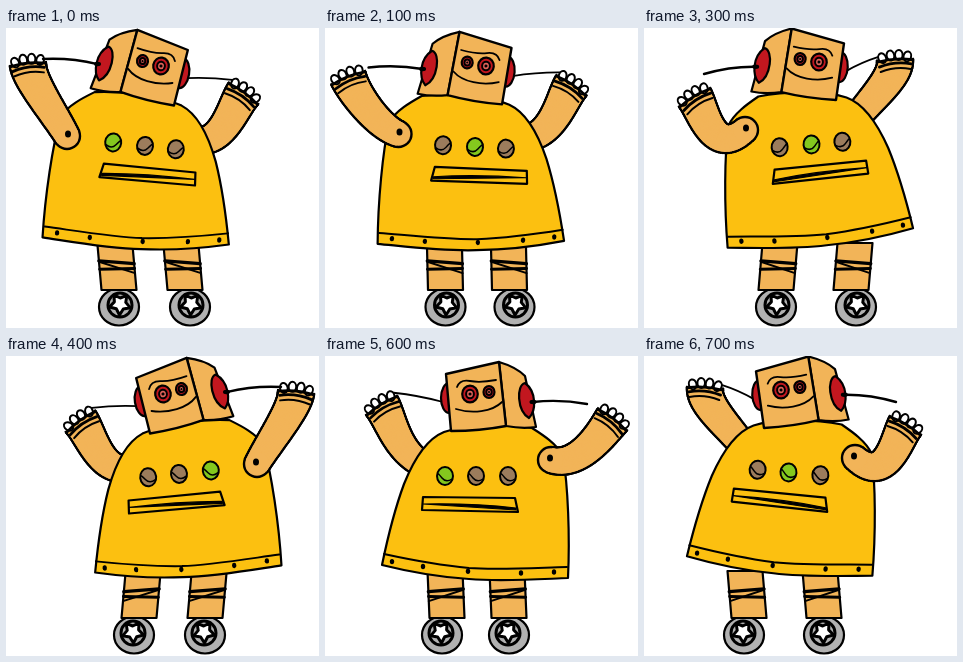
An HTML page with a canvas that plays this animation: 313 by 300 pixels, repeating every 0.8 s.

```html
<!DOCTYPE html>
<html lang="en">
<head>
<meta charset="utf-8">
<title>Dancing robot</title>
<style>
html, body { margin: 0; width: 100%; height: 100%; overflow: hidden; background: #fff; }
canvas { display: block; }
</style>
</head>
<body>
<canvas id="stage" width="313" height="300"></canvas>
<script>
const ctx = document.getElementById('stage').getContext('2d');
const STEP = 100, WIDTH = 312;
const SKIN = '#f2b458', GOLD = '#fcc010', RED = '#c2171f', GREY = '#b1b1b1',
      BROWN = '#9c7c5c', GREEN = '#84c81e', BLACK = '#000';

// Key poses. Parts are [x, y, degrees]; an arm hangs from wrist over elbow to shoulder.
const leanLeft = {
  body: [140, 118, 6.2], panel: [140, 118, 6.2], head: [155, 38, 9],
  near: { wrist: [22, 37, -6], elbow: [48, 85], shoulder: [61, 108] },
  far: { wrist: [237, 66, 36], elbow: [216, 118], shoulder: [190, 112] },
  tip: [37, 31], feet: [113, 184]
};
const upright = {
  body: [162, 120, 0], panel: [162, 120, 0], head: [167, 38, 0],
  near: { wrist: [25, 64, -37], elbow: [58, 112], shoulder: [86, 104] },
  far: { wrist: [255, 50, 32], elbow: [240, 94], shoulder: [215, 108] },
  tip: [50, 48], feet: [128, 195]
};
const leanRight = {
  body: [173, 114.5, -2], panel: [168.5, 116.3, -5], head: [175, 34, 3],
  near: { wrist: [51, 70, -31], elbow: [70, 130], shoulder: [101, 102] },
  far: { wrist: [251, 33, -4], elbow: [226, 72], shoulder: [206, 98] },
  tip: [60, 46], feet: [132, 212]
};

const mix = (a, b, t) => {
  if (typeof a === 'number') return a + (b - a) * t;
  if (Array.isArray(a)) return a.map((v, i) => mix(v, b[i], t));
  return Object.fromEntries(Object.keys(a).map(k => [k, mix(a[k], b[k], t)]));
};
const poses = [leanLeft, mix(leanLeft, upright, .5), upright, leanRight];
const lights = [0, 1, 2, 1];

function paint(path, fill, width = 2.2) {
  if (fill) { ctx.fillStyle = fill; ctx.fill(path); }
  if (width) { ctx.lineWidth = width; ctx.stroke(path); }
}
const shape = (d, fill, width) => paint(new Path2D(d), fill, width);
const poly = (pts, fill, width) => shape('M' + pts.join('L') + 'Z', fill, width);
const line = (pts, width) => shape('M' + pts.join('L'), null, width);

function oval(x, y, rx, ry, fill, width, turn = 0) {
  const p = new Path2D();
  p.ellipse(x, y, rx, ry, turn, 0, Math.PI * 2);
  paint(p, fill, width);
}

// Point (dx, dy) from a part's pivot, turned with the part.
function reach([x, y, deg], dx, dy) {
  const a = deg * Math.PI / 180, c = Math.cos(a), s = Math.sin(a);
  return [x + dx * c - dy * s, y + dx * s + dy * c];
}

// Runs draw with the pivot (px, py) moved to the part's place.
function placed([x, y, deg], px, py, draw) {
  ctx.save();
  ctx.translate(x, y);
  ctx.rotate(deg * Math.PI / 180);
  ctx.translate(-px, -py);
  draw();
  ctx.restore();
}

function hand() {
  for (let i = 0; i < 4; i++) {
    const x = (i - 1.5) * 8.4;
    oval(x, -6 + x * x / 70, 3.8, 5, '#fff', 2, x / 40);
  }
  shape('M-18 0Q0 -4 18 0M-16 5Q0 0 16 4', null, 2.8);
  shape('M-15 10Q0 5 15 9', null, 2);
}

// A tapering tube along a cubic curve, built from its cross sections.
function arm({ wrist, elbow, shoulder }) {
  const cuff = reach(wrist, 0, 16), steps = 60;
  const curve = (k, t) => {
    const u = 1 - t;
    return u*u*u * wrist[k] + 3*u*u*t * cuff[k] + 3*u*t*t * elbow[k] + t*t*t * shoulder[k];
  };
  const slope = (k, t) => curve(k, t + .001) - curve(k, t - .001);
  for (const [edge, color] of [[1.2, BLACK], [-1.2, SKIN]]) {
    ctx.strokeStyle = color;
    ctx.lineCap = 'butt';
    for (let i = 0; i <= steps; i++) {
      const t = i / steps, r = 18 - 5 * t + edge;
      const x = curve(0, t), y = curve(1, t), dx = slope(0, t), dy = slope(1, t);
      const nx = -dy * r / Math.hypot(dx, dy), ny = dx * r / Math.hypot(dx, dy);
      line([[x - nx, y - ny], [x + nx, y + ny]], 4);
    }
    oval(...shoulder, 13 + edge, 13 + edge, color, 0);
  }
  ctx.strokeStyle = BLACK;
  ctx.lineCap = 'round';
  placed(wrist, 0, 0, hand);
}

function leg(x, lean) {
  const at = (side, t) => [x + side * 17.5 + (1 - t) * lean, 215 + t * 47];
  poly([at(-1, 0), at(-1, 1), at(1, 1), at(1, 0)], SKIN);
  line([at(-1, .38), at(1, .44)], 3.4);
  line([at(-1, .56), at(1, .54)], 3);
  line([at(-1, .4), at(1, .64)], 2);
}

function wheel(x) {
  const y = 279;
  oval(x, y, 20, 18.5, GREY);
  oval(x + 1, y - 2, 12, 12, GREY, 3);
  const star = [];
  for (let i = 0; i < 10; i++) {
    const r = i % 2 ? 6 : 11, a = i * Math.PI / 5 - .9;
    star.push([x + 1 + r * Math.cos(a), y - 3 + r * Math.sin(a)]);
  }
  poly(star, '#fff', 3);
}

function torso() {
  shape('M69 222C67 180 69 130 74 100C80 88 94 79 105 72C130 68 170 68 193 76' +
        'C213 84 225 108 233 128C243 155 249 180 255 209' +
        'C235 214 200 221 168 223C135 226 95 223 69 222Z', GOLD);
  shape('M70 211C105 212 140 214 168 212C200 209 230 203 253 198', null, 2);
  for (const x of [83, 116, 169, 214, 245])
    oval(x, 217 - ((x - 120) / 37) ** 2, 2.2, 2.7, BLACK, 0);
}

function panel(lit) {
  [129, 161, 192].forEach((x, i) => {
    oval(x, 120, 8, 9, i === lit ? GREEN : BROWN, 2);
    shape(`M${x - 7} 123Q${x - 1} 127 ${x + 3} 122T${x + 7} 118`, null, 1.5);
  });
  poly([[119, 156], [122, 142], [214, 141], [215, 154]], null);
  shape('M121 152Q165 147 214 148Q165 151 121 154Z', BLACK, 1.2);
}

function eye(x, y, r) {
  oval(x, y, r, r * 1.08, RED);
  oval(x, y, r * .5, r * .55, '#e0635a', 2);
  oval(x, y, r * .2, r * .2, BLACK, 0);
}

function head() {
  oval(188, 42, 8, 15, RED);
  shape('M138 6Q121 11 112 20L101 71Q115 73 131 70Z', SKIN);
  shape('M138 6L191 18L186 75Q157 75 131 70Z', SKIN, 2.4);
  shape('M108 62C101 55 100 36 112 27C121 29 120 55 108 62Z', RED);
  eye(148, 36, 5.5);
  eye(167, 38, 7.8);
  shape('M141 24Q157 27 167 25T180 31', null, 1.8);
  shape('M135 46C145 56 165 58 181 53', null, 1.8);
}

function wire(from, to, sag, width) {
  const [x, y] = mix(from, to, .5);
  shape(`M${from}Q${x} ${y + sag} ${to}`, null, width);
}

function robot(pose, lit) {
  const ear = reach(pose.head, -63, 8), [x, y] = pose.near.shoulder;
  wire(reach(pose.head, 27, 8), reach(pose.far.wrist, -17, -5), -2, 1.8);
  arm(pose.far);
  pose.feet.forEach((foot, i) => {
    wheel(foot);
    leg(foot - 5 * i, 2 - pose.body[2]);
  });
  placed(pose.body, 162, 120, torso);
  placed(pose.panel, 162, 120, () => panel(lit));
  placed(pose.head, 167, 38, head);
  arm(pose.near);
  oval(x + 1, y - 2, 3, 3.6, BLACK, 0);
  wire(ear, pose.tip, -4, 2.4);
  oval(...ear, 3.5, 2.2, BLACK, 0);
}

function draw(now) {
  const step = Math.floor(now / STEP) % 8, i = step % 4;
  ctx.setTransform(1, 0, 0, 1, 0, 0);
  ctx.fillStyle = '#fff';
  ctx.fillRect(0, 0, 313, 300);
  ctx.strokeStyle = BLACK;
  ctx.lineCap = ctx.lineJoin = 'round';
  // The second half of the dance mirrors the first.
  if (step > 3) ctx.setTransform(-1, 0, 0, 1, WIDTH, 0);
  robot(poses[i], lights[i]);
}

function loop() {
  draw(performance.now());
  requestAnimationFrame(loop);
}
loop();
</script>
</body>
</html>
```
